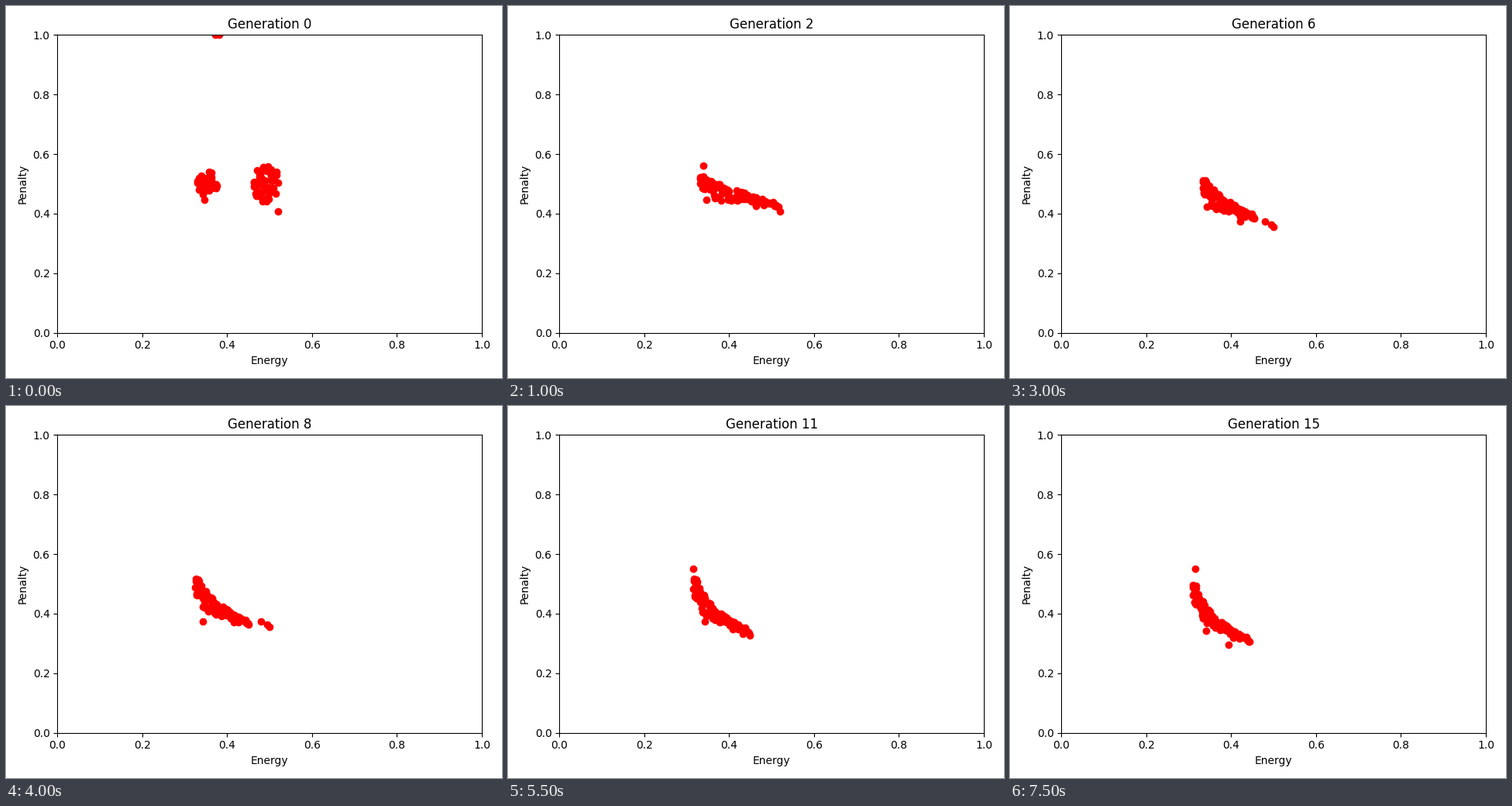
Animation of 640x480 px, one loop 8 s. Source, as a matplotlib script:

```python
import numpy as np
import matplotlib.pyplot as plt
from matplotlib.animation import FuncAnimation

GENERATIONS = 16
ASPECT = np.array([548, 384])  # axes size in pixels

# The front is a quadratic curve: its start, bend and end at a few generations
CURVE_GENS = [2, 6, 10, 15]
CURVES = np.array([
    [(0.334, 0.525), (0.345, 0.462), (0.520, 0.427)],
    [(0.335, 0.515), (0.350, 0.420), (0.458, 0.388)],
    [(0.321, 0.525), (0.328, 0.390), (0.450, 0.348)],
    [(0.312, 0.500), (0.324, 0.360), (0.447, 0.309)],
])

# Individuals away from the crowd: x, y, first and last generation
LONERS = [
    (0.372, 1.000, 0, 0), (0.381, 1.000, 0, 0), (0.339, 0.560, 1, 2),
    (0.346, 0.446, 0, 5), (0.520, 0.407, 0, 4), (0.342, 0.423, 4, 8),
    (0.421, 0.373, 3, 7), (0.494, 0.363, 4, 9), (0.479, 0.373, 5, 9),
    (0.500, 0.355, 6, 9), (0.342, 0.373, 8, 12), (0.432, 0.333, 9, 12),
    (0.315, 0.550, 10, 15), (0.448, 0.326, 11, 13), (0.341, 0.343, 14, 15),
    (0.394, 0.295, 15, 15),
]


def cluster(rng, count, center, radius):
    """Random points in an ellipse, a little denser in the middle."""
    angle = rng.uniform(0, 2 * np.pi, count)
    r = rng.uniform(0, 1, count) ** 0.6
    ring = np.column_stack([np.cos(angle), np.sin(angle)])
    return center + radius * ring * r[:, None]


def first_population():
    rng = np.random.default_rng(4)
    left = cluster(rng, 36, (0.354, 0.502), (0.024, 0.044))
    right = cluster(rng, 52, (0.492, 0.500), (0.032, 0.062))
    return np.vstack([left, right])


def front(gen, count=80):
    """Points along the curve, scattered across a band that narrows with time."""
    rng = np.random.default_rng(7)
    t = (np.arange(count) + rng.uniform(0, 1, count)) / count
    side = rng.uniform(-1, 1, count)

    i = np.interp(gen, CURVE_GENS, range(len(CURVE_GENS)))
    k = min(int(i), len(CURVES) - 2)
    a, b, c = (CURVES[k] + (CURVES[k + 1] - CURVES[k]) * (i - k)) * ASPECT

    t = t[:, None]
    point = a * (1 - t) ** 2 + 2 * b * t * (1 - t) + c * t ** 2
    dx, dy = ((b - a) * (1 - t) + (c - b) * t).T
    normal = np.column_stack([-dy, dx]) / np.hypot(dx, dy)[:, None]
    spread = np.interp(gen, [2, 15], [8, 5])
    width = 2 + spread * np.sin(np.pi * t)
    return (point + normal * width * side[:, None]) / ASPECT


def population(gen):
    groups = [[(x, y) for x, y, first, last in LONERS if first <= gen <= last]]
    if gen < 2:
        groups.append(first_population()[::gen + 1])
    if gen > 0:
        groups.append(front(gen)[::2 if gen == 1 else 1])
    return np.vstack(groups)


fig, ax = plt.subplots(figsize=(6.4, 4.8), dpi=100)
dots = ax.scatter([], [], color="red")
ax.set(xlim=(0, 1), ylim=(0, 1), xlabel="Energy", ylabel="Penalty")
title = ax.set_title("Generation 0")
fig.tight_layout()


def update(gen):
    dots.set_offsets(population(gen))
    title.set_text(f"Generation {gen}")
    return dots, title


anim = FuncAnimation(fig, update, frames=GENERATIONS, interval=500,
                     repeat=True, repeat_delay=0)
plt.show()
```
